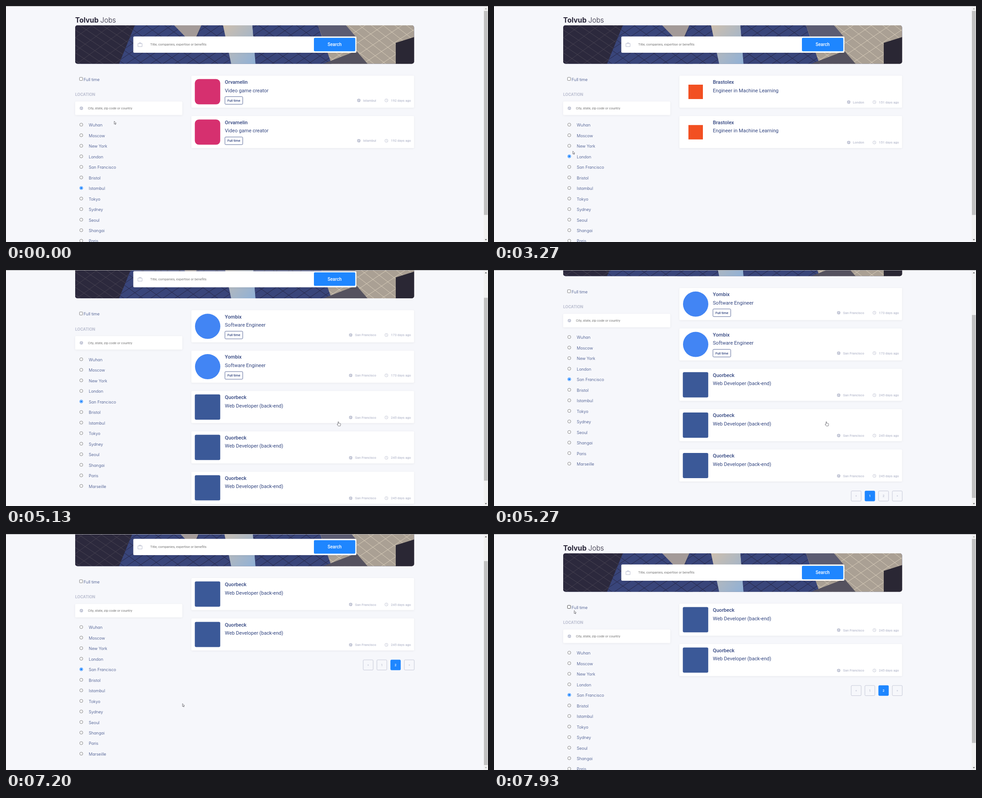
An HTML page that plays this animation: 1066 px wide and 525 px high, repeating every 8000 ms.

```html
<!DOCTYPE html>
<html lang="en">
<head>
<meta charset="utf-8">
<title>Jobs</title>
<style>
  html, body { margin: 0; width: 100%; height: 100%; overflow: hidden; background: #f6f7fb; }
  svg { display: block; width: 1066px; height: 525px; }
  text { font-family: Roboto, sans-serif; white-space: pre; }
  .geo { font-family: Inter, sans-serif; font-weight: 300; font-feature-settings: "cv11"; }
  .label { font-size: 9.1px; fill: #334680; }
  .hint { font-size: 7.4px; fill: #757575; }
  .firm { font-size: 11.1px; font-weight: 500; fill: #334680; }
  .role { font-size: 11.1px; fill: #334680; }
  .meta { font-size: 7.4px; font-weight: 500; fill: #b9bdcf; text-anchor: end; }
  .mid { text-anchor: middle; font-weight: 500; }
  .panel { fill: #fff; filter: drop-shadow(0 1px 2px rgba(0, 0, 0, .06)); }
</style>
</head>
<body>
<svg viewBox="0 0 1066 525" xmlns="http://www.w3.org/2000/svg">
  <defs>
    <clipPath id="banner"><rect x="153" y="43" width="749.5" height="85.5" rx="5"/></clipPath>
    <linearGradient id="sky" x1="0" y1="0" x2="1" y2="1">
      <stop offset="0" stop-color="#cdbfae"/><stop offset="1" stop-color="#8fb0d6"/>
    </linearGradient>
    <pattern id="dark" width="26" height="14" patternUnits="userSpaceOnUse" patternTransform="rotate(34) skewX(-20)">
      <rect width="26" height="14" fill="#2c293d"/><path d="M0 0H26M0 0V14" stroke="#4d4856" stroke-width="1.2"/>
    </pattern>
    <pattern id="blue" width="26" height="15" patternUnits="userSpaceOnUse" patternTransform="rotate(-34) skewX(20)">
      <rect width="26" height="15" fill="#39457a"/><path d="M0 0H26M0 0V15" stroke="#282a4c" stroke-width="2"/>
    </pattern>
    <pattern id="pale" width="24" height="16" patternUnits="userSpaceOnUse" patternTransform="rotate(38) skewX(-18)">
      <rect width="24" height="16" fill="#aaa094"/><path d="M0 0H24M0 0V16" stroke="#ddd1bd" stroke-width="1.6"/>
    </pattern>
  </defs>
  <g id="page">
    <text class="geo" x="153" y="37" font-size="15.5" style="font-weight:700" fill="#282538">Tolvub</text>
    <text class="geo" x="208.6" y="37" font-size="15.2" fill="#282538">Jobs</text>
    <g clip-path="url(#banner)">
      <rect x="153" y="43" width="750" height="86" fill="#333b66"/>
      <path d="M153 43H285L250 129H153Z" fill="url(#dark)"/>
      <path d="M285 43H385L440 129H250Z" fill="url(#blue)"/>
      <path d="M372 43H432L420 70H398Z" fill="#a39a98"/>
      <path d="M432 43H480L498 129H405Z" fill="url(#blue)"/>
      <path d="M480 43H545L552 129H498Z" fill="url(#sky)"/>
      <path d="M545 43H690L720 129H552Z" fill="url(#blue)"/>
      <path d="M690 43H903V129H720Z" fill="url(#pale)"/>
      <path d="M690 43H752L775 70H700Z" fill="#5c5c72"/>
      <path d="M700 129L775 100L800 129Z" fill="#55525f"/>
      <path d="M862 82L903 69V129H862Z" fill="#2a2734"/>
    </g>
    <rect class="panel" x="281.5" y="67.8" width="493.5" height="36.2" rx="2.5"/>
    <path d="M291.8 83.5H301V90.3H291.8ZM294.4 83.5V81.8H298.4V83.5" fill="none" stroke="#b9bdcf"/>
    <text class="hint" x="319" y="88">Title, companies, expertise or benefits</text>
    <rect x="681" y="70.7" width="91.5" height="30" rx="2.2" fill="#1e86ff"/>
    <text class="mid" x="726.7" y="89.2" font-size="10" fill="#fff">Search</text>
    <rect id="check" x="162.6" y="158.8" width="6.8" height="6.8" rx=".8" fill="#fff" stroke-width=".9"/>
    <text class="geo label" x="171.8" y="166.5">Full time</text>
    <text class="geo" x="153" y="200" font-size="8.6" style="font-weight:700" fill="#b9bdcf">LOCATION</text>
    <rect class="panel" x="153" y="212.5" width="237" height="30" rx="2.2"/>
    <text class="hint" x="181.3" y="230">City, state, zip code or country</text>
    <g id="places"></g>
    <g id="list"></g>
    <g id="pager"></g>
  </g>
  <rect x="1056.5" width="9.5" height="525" fill="#f1f1f1"/>
  <rect id="thumb" x="1057" width="8.5" fill="#c1c1c1"/>
  <path id="up" d="M1059 7.2L1061.3 4.8L1063.6 7.2Z"/>
  <path id="down" d="M1059 518.8L1061.3 521.2L1063.6 518.8Z"/>
  <rect width="1066" height="1" fill="#a0a0a3"/>
  <g id="cursor" fill="#fff" stroke="#44444c" stroke-width=".7" stroke-linejoin="round">
    <path id="arrow" d="M.3 .3V6.8L1.9 5.4L2.9 7.7L3.9 7.2L2.9 5L4.9 4.8Z"/>
    <path id="hand" d="M-.8 .9Q0 -.2 .8 .9V4Q1.7 3.3 2.3 4.2Q3.2 3.7 3.7 4.5Q4.7 4.1 5 5.2V7.6L4.2 10H-.3L-2.6 6.9Q-2.7 5.6 -1.5 5.9L-.8 6.5Z"/>
  </g>
</svg>
<script>
const $ = id => document.getElementById(id);
const LOOP = 8000, VIEW = 525, TRACK = 503, STEP = 89.8;
const BLUE = '#1e86ff', PALE = '#b9bdcf';

const cities = ['Wuhan', 'Moscow', 'New York', 'London', 'San Francisco', 'Bristol',
  'Istambul', 'Tokyo', 'Sydney', 'Seoul', 'Shangai', 'Paris', 'Marseille'];
const rowY = i => 264 + 23.48 * i;

const square = (x, y, s, fill, rx = 0) =>
  `<rect x="${x}" y="${y}" width="${s}" height="${s}" rx="${rx}" fill="${fill}"/>`;
const disc = (x, y, r, fill) => `<circle cx="${x}" cy="${y}" r="${r}" fill="${fill}"/>`;

const jobs = {
  photo: { firm: 'Orvamelin', role: 'Video game creator', city: 'Istambul', gx: 780.3, days: 192,
    full: true, logo: square(417.6, 162.6, 56.2, '#d6306f', 9) },
  design: { firm: 'Ozdel', role: 'UX / UI Designer', city: 'Bristol', gx: 788, days: 182,
    tx: 477, logo: disc(442, 191, 25, '#f58220') },
  learn: { firm: 'Brastolex', role: 'Engineer in Machine Learning', city: 'London', gx: 784.5, days: 151,
    logo: square(430, 175, 32, '#f25022') },
  soft: { firm: 'Yombix', role: 'Software Engineer', city: 'San Francisco', gx: 762.3, days: 173,
    full: true, logo: disc(446, 190.7, 28, '#4285f4') },
  web: { firm: 'Quorbeck', role: 'Web Developer (back-end)', city: 'San Francisco', gx: 762.3, days: 245,
    logo: square(417.6, 162.6, 56.2, '#3b5998', 3) }
};
const { photo, design, learn, soft, web } = jobs;

// Result lists and the moment each appears
const lists = [
  { at: 0, jobs: [photo, photo] },
  { at: 1400, jobs: [design, design, design] },
  { at: 2530, jobs: [learn, learn] },
  { at: 4800, jobs: [soft, soft, web, web, web], page: 1 },
  { at: 6470, jobs: [web, web], page: 2 }
];
const picks = [{ at: 0, row: 6 }, { at: 1330, row: 5 }, { at: 2470, row: 3 }, { at: 4730, row: 4 }];
const presses = [[1270, 1330, 5], [2400, 2470, 3], [4665, 4730, 4]];

// Pointer path: time, x, y
const path = [
  [0, 239, 256], [870, 197, 387], [930, 197, 387], [1070, 194, 382], [1940, 194, 382],
  [2400, 174, 338], [3140, 174, 338], [3330, 174, 318], [3540, 174, 318], [4130, 207, 417],
  [4400, 204, 376], [4420, 204, 376], [4530, 204, 362], [4700, 204, 362], [5060, 735, 337],
  [5290, 735, 337], [5470, 805, 426], [6330, 860, 490], [6670, 860, 490], [7200, 390, 377],
  [7530, 75, 288], [7930, 177, 170], [8000, 177, 170]
];

const clamp = u => Math.max(0, Math.min(1, u));
const span = (t, a, b) => clamp((t - a) / (b - a));
const current = (items, t) => items.filter(s => s.at <= t).pop();

const globe = (x, y) => disc(x, y, 3.7, PALE) +
  `<path d="M${x - 2.8} ${y - .6}l2 2v1.4M${x + .2} ${y - 2.6}v1.3l-1.2 .9h2.2l1.4 1.8" fill="none" stroke="#fff" stroke-width=".8"/>`;
const clock = (x, y) =>
  `<path d="M${x} ${y - 2}v2.2l1.6 1" fill="none" stroke="${PALE}" stroke-width=".7"/>` +
  `<circle cx="${x}" cy="${y}" r="3.4" fill="none" stroke="${PALE}" stroke-width=".8"/>`;

function card(job, i) {
  const x = job.tx || 484, y = job.full ? 210 : 213.8;
  const badge = job.full ? `<rect x="484.2" y="201.6" width="39.4" height="17" rx="2" fill="none" stroke="#334680" stroke-width=".8"/>
    <text class="mid" x="503.9" y="212.7" font-size="7.4" fill="#334680">Full time</text>` : '';
  return `<g transform="translate(0 ${i * STEP})">
    <rect class="panel" x="410" y="155" width="492.5" height="71.3" rx="2.2"/>${job.logo}
    <text class="firm" x="${x}" y="173">${job.firm}</text>
    <text class="role" x="${x}" y="191.5">${job.role}</text>${badge}
    ${globe(job.gx, y)}<text class="meta" x="818.7" y="${y + 2.7}">${job.city}</text>
    ${clock(841.3, y)}<text class="meta" x="895.6" y="${y + 2.7}">${job.days} days ago</text></g>`;
}

const pagerY = n => 246.8 + (n - 1) * STEP;

function pager(y, page, hot) {
  return ['«', 1, 2, '»'].map((mark, i) => {
    const x = 790 + 30.3 * i, on = mark === page || mark === hot;
    return `<rect x="${x}" y="${y + .4}" width="22" height="22.6" rx="2" stroke-width=".8"
      fill="${on ? BLUE : '#f6f7fb'}" stroke="${on ? BLUE : PALE}"/>
      <text class="mid" x="${x + 11}" y="${y + 14.2}" font-size="7" fill="${on ? '#fff' : PALE}">${mark}</text>`;
  }).join('');
}

$('places').innerHTML = globe(166.7, 227.5) + cities.map((name, i) =>
  `<circle class="ring" cx="166.5" cy="${rowY(i)}" r="3.4" fill="#fff" stroke-width=".9"/>
   <circle class="dot" cx="166.5" cy="${rowY(i)}" r="2.1"/>
   <text class="geo label" x="183" y="${rowY(i) + 4.2}">${name}</text>`).join('');
const rings = [...document.querySelectorAll('.ring')], dots = [...document.querySelectorAll('.dot')];

function pointer(t) {
  const k = Math.max(1, path.findIndex(p => p[0] > t));
  const [a, ax, ay] = path[k - 1], [b, bx, by] = path[k];
  const u = span(t, a, b), e = u * u * (3 - 2 * u);
  return [ax + (bx - ax) * e, ay + (by - ay) * e];
}

function scrollAt(t) {
  if (t < 6470) return 124 * (1 - (1 - span(t, 5050, 5470)) ** 3.5);
  return 57 * (1 - span(t, 7220, 7530)) ** 3;
}

let shown = '';
function render(t) {
  const list = current(lists, t), n = list.jobs.length, top = scrollAt(t);
  const [x, y] = pointer(t), py = y + top;
  const picked = current(picks, t).row;
  const press = presses.find(p => t >= p[0] && t < p[1]);

  const barY = pagerY(n);
  const overPager = list.page && x > 790 && x < 903 && py > barY && py < barY + 23;
  const overCard = x > 410 && x < 902 && py > 155 && (py - 155) % STEP < 71.3 && py < 155 + n * STEP;
  const hot = overPager && x > 850 && x < 873 ? 2 : 0;

  const key = list.at + ':' + hot;
  if (key !== shown) {
    $('list').innerHTML = list.jobs.map(card).join('');
    $('pager').innerHTML = list.page ? pager(barY, list.page, hot) : '';
    shown = key;
  }

  cities.forEach((name, i) => {
    const over = Math.abs(py - rowY(i) - .6) < 6.2 && x > 162 && x < 183 + name.length * 4.8;
    const on = i === picked, down = press && press[2] === i;
    const color = on ? (over ? '#005cc8' : '#0075ff') : down ? '#a0a0a0' : over ? '#4f4f4f' : '#767676';
    rings[i].setAttribute('stroke', color);
    dots[i].setAttribute('fill', on ? color : 'none');
  });
  const overCheck = x > 162 && x < 208 && Math.abs(py - 163) < 8;
  $('check').setAttribute('stroke', overCheck ? '#3a3a3a' : '#767676');

  const full = n === 5 ? 649 : 582;
  $('page').setAttribute('transform', `translate(0 ${-top})`);
  $('thumb').setAttribute('y', 11 + TRACK * top / full);
  $('thumb').setAttribute('height', TRACK * VIEW / full);
  $('up').setAttribute('fill', top > .5 ? '#505050' : '#a3a3a3');
  $('down').setAttribute('fill', top < full - VIEW - .5 ? '#505050' : '#a3a3a3');

  const link = overPager || overCard;
  $('cursor').setAttribute('transform', `translate(${x} ${y})`);
  $('arrow').style.display = link ? 'none' : '';
  $('hand').style.display = link ? '' : 'none';
}

const start = performance.now();
function tick() {
  render((performance.now() - start) % LOOP);
  requestAnimationFrame(tick);
}
tick();
</script>
</body>
</html>
```
